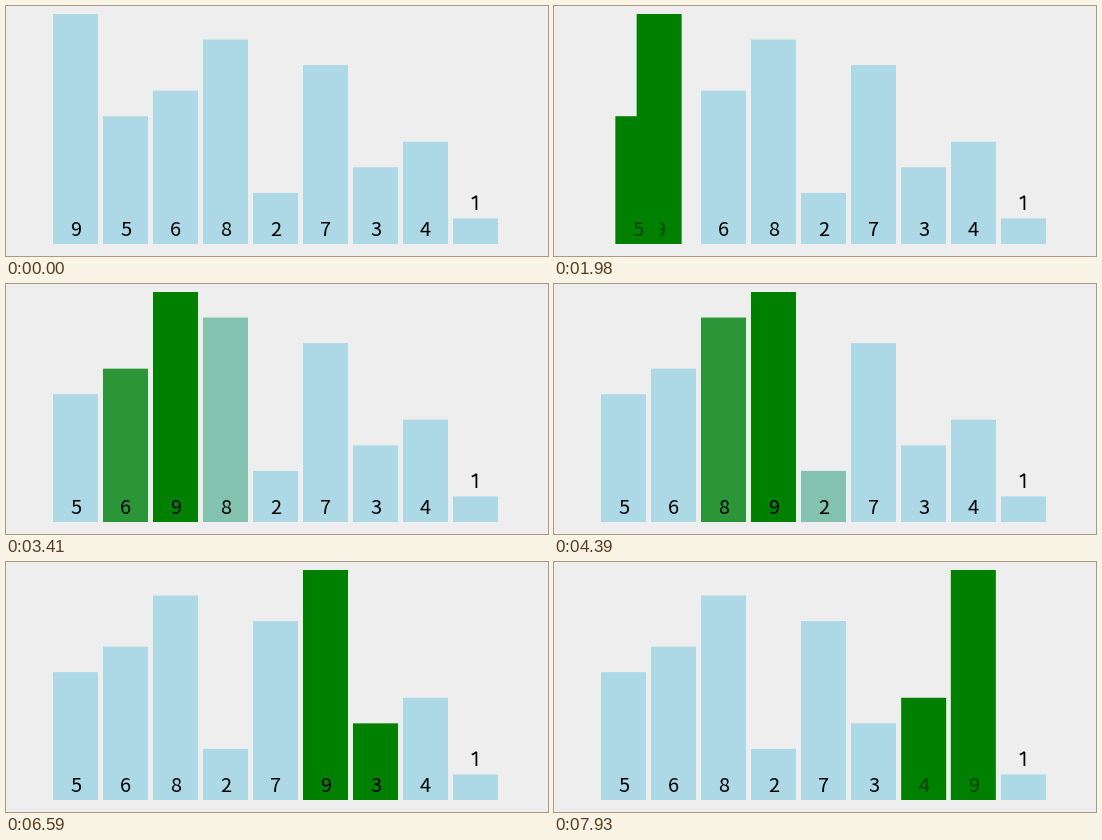
A matplotlib script for the animation above (8 s loop, 542 px wide and 250 px high).

```python
import matplotlib.pyplot as plt
import numpy as np
from matplotlib.animation import FuncAnimation
from matplotlib.patches import Rectangle

WIDTH, HEIGHT, DPI = 542, 250, 100
LOOP, TICK = 8000, 20
LEFT, STEP, BAR_WIDTH, BASE, TALLEST = 47, 50, 45, 238, 230
VALUES = [9, 5, 6, 8, 2, 7, 3, 4, 1]
IDLE = np.array([173, 216, 230]) / 255
ACTIVE = np.array([0, 128, 0]) / 255
MOVING_LABEL = (0, 0.25, 0)
LABEL_INSET, LABEL_BASE = 17, 230

# Each comparison first changes the colours, then swaps the two bars.
DURATION = 180
COMPARISONS = np.arange(len(VALUES) - 1)
FADE_STARTS = 1418 + 980 * COMPARISONS
SWAP_STARTS = 1914 + 975 * COMPARISONS


def bezier(a, b, u):
    return 3 * a * u * (1 - u) ** 2 + 3 * b * u ** 2 * (1 - u) + u ** 3


CURVE = np.linspace(0, 1, 400)
EASE_X, EASE_Y = bezier(0.25, 0.25, CURVE), bezier(0.1, 1, CURVE)


def ease(starts, now):
    return np.interp((now - starts) / DURATION, EASE_X, EASE_Y)


fig = plt.figure(figsize=(WIDTH / DPI, HEIGHT / DPI), dpi=DPI,
                 facecolor="#eeeeee")
ax = fig.add_axes([0, 0, 1, 1])
ax.set(xlim=(0, WIDTH), ylim=(HEIGHT, 0))
ax.axis("off")


class Bar:
    def __init__(self, slot, value):
        height = TALLEST * value / max(VALUES)
        x = LEFT + STEP * slot
        self.box = ax.add_patch(Rectangle(
            (x, BASE - height), BAR_WIDTH, height, facecolor=IDLE,
            linewidth=0, snap=False, zorder=slot + 1))
        self.label = None
        if value == 1:
            # A one without a foot, above the bar that is too short for it.
            ax.plot([465.8, 467.8, 470.4, 470.4], [192.6, 191.8, 190, 204],
                    color="black", linewidth=1.25, solid_capstyle="butt",
                    solid_joinstyle="miter", zorder=slot + 1.5)
        else:
            self.label = ax.text(
                x + LABEL_INSET, LABEL_BASE, str(value), ha="left",
                va="baseline", fontsize=20 * 72 / DPI,
                family="Noto Sans CJK JP", zorder=slot + 1.5)

    def update(self, slot, green, moving):
        x = LEFT + STEP * slot
        self.box.set_x(x)
        self.box.set_facecolor(IDLE + (ACTIVE - IDLE) * green)
        if self.label:
            self.label.set_x(x + LABEL_INSET)
            self.label.set_color(MOVING_LABEL if moving else "black")


bars = [Bar(slot, value) for slot, value in enumerate(VALUES)]


def draw(frame):
    now = (frame + 0.5) * TICK
    fades, swaps = ease(FADE_STARTS, now), ease(SWAP_STARTS, now)
    moving = (swaps > 0) & (swaps < 1)
    # The largest value travels right while each neighbour steps left once.
    bars[0].update(swaps.sum(), fades[0], moving.any())
    for slot in range(1, len(bars)):
        done = fades[slot] if slot < len(fades) else 0
        bars[slot].update(slot - swaps[slot - 1], fades[slot - 1] - done,
                          moving[slot - 1])
    return []


anim = FuncAnimation(fig, draw, frames=LOOP // TICK, interval=TICK,
                     repeat=True, repeat_delay=0)
plt.show()
```
